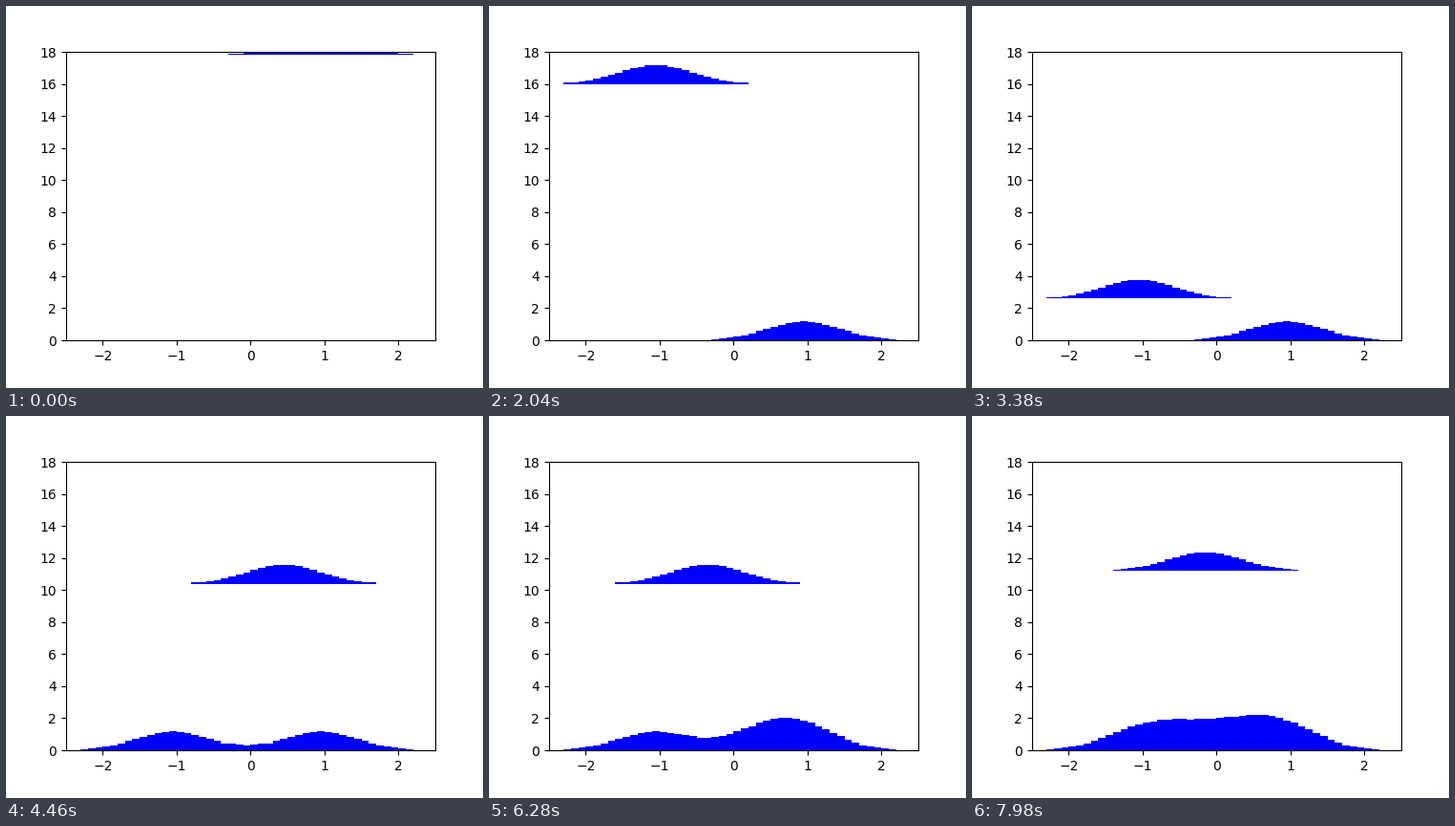
These frames come from a looping animation (500x400 px, 8000 ms). A matplotlib script:

```python
import numpy as np
import matplotlib.pyplot as plt
from matplotlib.animation import FuncAnimation

FRAMES, INTERVAL = 400, 20
TOP, STEP = 18, 0.2
CELLS, HALF = 50, 12
CENTERS = [34, 14, 29, 21, 23]  # cell indices where the bumps drop

edges = np.linspace(-2.5, 2.5, CELLS + 1)
offsets = np.arange(-HALF, HALF + 1) * 0.1
bump = 1.165 * np.exp(-2 * offsets**2)


def build_timeline():
    """Yield (heap, center, base) for each frame; center is None on landing."""
    heap = np.zeros(CELLS)
    for c in CENTERS:
        span = slice(c - HALF, c + HALF + 1)
        floor = heap[span].min()
        k, base = 0, TOP
        while True:
            yield heap, c, base
            if base < floor:
                break
            k += 1
            base = round(TOP - STEP * k, 6)
        heap = heap.copy()
        heap[span] += bump
        yield heap, None, 0


timeline = list(build_timeline())[1:FRAMES + 1]

fig, ax = plt.subplots(figsize=(5, 4), dpi=100)
fig.subplots_adjust(left=0.125, right=0.9, bottom=0.125, top=0.88)
ax.set_xlim(-2.5, 2.5)
ax.set_ylim(0, TOP)

ground = ax.stairs(np.zeros(CELLS), edges, baseline=0, fill=True, color="blue")
faller = ax.stairs(bump, edges[:bump.size + 1], baseline=0, fill=True,
                   color="blue")
ax.set_xlim(-2.5, 2.5)
ax.set_ylim(0, TOP)


def draw(i):
    heap, c, base = timeline[i]
    ground.set_data(heap)
    faller.set_visible(c is not None)
    if c is not None:
        faller.set_data(bump + base, edges[c - HALF:c + HALF + 2], base)
    return ground, faller


anim = FuncAnimation(fig, draw, frames=FRAMES, interval=INTERVAL,
                     repeat=True, repeat_delay=0)
plt.show()
```
